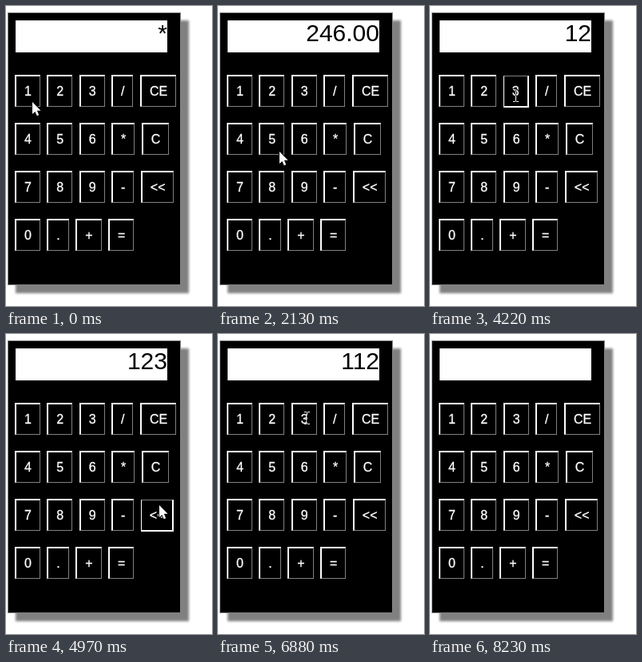
Animation, 258 px wide and 375 px high, one loop 8610 ms. Source, as an HTML page:

```html
<!DOCTYPE html>
<html lang="en">
<head>
<meta charset="utf-8">
<title>Calculator</title>
<style>
  html, body { margin: 0; width: 100%; height: 100%; overflow: hidden; background: #fff; }
  body { position: relative; font: 16px "Liberation Sans", Arial, sans-serif; }
  #calc {
    position: absolute; left: 2px; top: 8px; width: 217px; height: 341px; box-sizing: border-box;
    background: #000; border: 1px solid #808080; box-shadow: 10px 10px 3px #808080;
  }
  #display {
    position: absolute; left: 12px; top: 18px; width: 190px; height: 40px;
    background: #fff; color: #000; font-size: 30px; line-height: 31px; text-align: right;
  }
  .row { position: absolute; left: 11px; display: flex; gap: 8.45px; }
  .key {
    height: 37px; line-height: 37px; padding: 0 10px; color: #fff; white-space: pre;
    border: solid; border-width: 2px 1px 1px 2px; border-color: #fff #808080 #808080 #fff;
    -webkit-text-stroke: .3px #fff;
  }
  .key.down {
    transform: translateY(1px);
    border-width: 1px 2px 2px 1px; border-color: #808080 #fff #fff #fff;
  }
  #mark {
    position: absolute; left: 190px; top: 207px; width: 9px; height: 28px;
    background: #0a5fd0; mix-blend-mode: lighten;
  }
  svg { position: absolute; left: 0; top: 0; width: 1px; height: 1px; overflow: visible; }
  #arrow path { fill: #fff; stroke: #000; stroke-width: 2; paint-order: stroke; }
  #beam { mix-blend-mode: difference; }
  #beam path { fill: none; stroke: #fff; }
</style>
</head>
<body>
<div id="calc"></div>
<div id="display"></div>
<div id="keys"></div>
<div id="mark"></div>
<svg id="arrow"><path d="M0 0V15L3.4 11.9L5.8 17.3L8.2 16.3L5.9 10.8H10.6Z"/></svg>
<svg id="beam"><path d="M-3 -7.5H0M1 -7.5H4M.5 -7V7M-3 7.5H0M1 7.5H4"/></svg>
<script>
const LOOP = 8610, STEP = 120, HOLD = 125;
const $ = id => document.getElementById(id);

// Pointer moves: start, end, x, y
const home = [33, 120];
const moves = [
  [120, 370, 61, 117], [630, 870, 174, 44], [990, 1110, 152, 279], [1890, 2730, 29, 120],
  [3220, 3370, 62, 116], [3490, 3730, 195, 185], [3860, 4100, 107, 112], [4350, 4830, 192, 214],
  [5480, 5720, 40, 160], [5840, 5960, 27, 108], [6360, 6360, 66, 108], [6610, 6880, 111, 105],
  [7250, 7630, 185, 108], [7870, 8230, 195, 380]
];

// Time of press, key, reading after release
const presses = [
  [370, "2", "2"], [1390, "=", "246.00"], [2970, "1", "1"], [3370, "2", "12"],
  [4220, "3", "123"], [4970, "<<", "12"], [5360, "<<", "1"], [6210, "1", "11"],
  [6485, "", "112"], [7000, "3", "1123"], [7630, "CE", ""]
];

const keys = {};
["1 2 3 / CE", "4 5 6 * C", "7 8 9 - <<", "0 . + ="].forEach((labels, i) => {
  const row = document.createElement("div");
  row.className = "row";
  row.style.top = 86 + 60 * i + "px";
  for (const label of labels.split(" ")) {
    const key = keys[label] = document.createElement("div");
    key.className = "key";
    key.textContent = label;
    row.append(key);
  }
  $("keys").append(row);
});
const centres = Object.values(keys).map(key => {
  const r = key.getBoundingClientRect();
  return [r.left + r.width / 2, r.top + r.height / 2];
});

// The pointer eases out of each move and is redrawn once per step
function pointAt(t) {
  let [x, y] = home;
  for (const [from, to, toX, toY] of moves) {
    if (t < from) break;
    const count = Math.floor((to - from) / STEP) + 1;
    const u = Math.min(1, (Math.floor((t - from) / STEP) + 1) / count);
    const e = 1 - (1 - u) ** 2;
    x += (toX - x) * e;
    y += (toY - y) * e;
  }
  return [Math.round(x), Math.round(y)];
}

const show = (id, on) => { $(id).style.visibility = on ? "visible" : "hidden"; };

function render(t) {
  let reading = "*", held = "", before = "", marked = false;
  for (const [at, key, result] of presses) {
    if (t < at) break;
    const released = t >= at + HOLD;
    if (released) reading = result;
    else held = key;
    // A double click selects part of the label until the next press
    marked = released && key === before;
    before = key;
  }
  $("display").textContent = reading;
  for (const label in keys) keys[label].classList.toggle("down", label === held);

  const [x, y] = pointAt(t);
  const overText = centres.some(([cx, cy]) => Math.abs(x - cx) < 6 && Math.abs(y - cy) < 9);
  for (const id of ["arrow", "beam"]) $(id).style.transform = `translate(${x}px, ${y}px)`;
  show("arrow", !overText);
  show("beam", overText);
  show("mark", marked);
}

const start = performance.now();
function frame() {
  render((performance.now() - start) % LOOP);
  requestAnimationFrame(frame);
}
frame();
</script>
</body>
</html>
```
